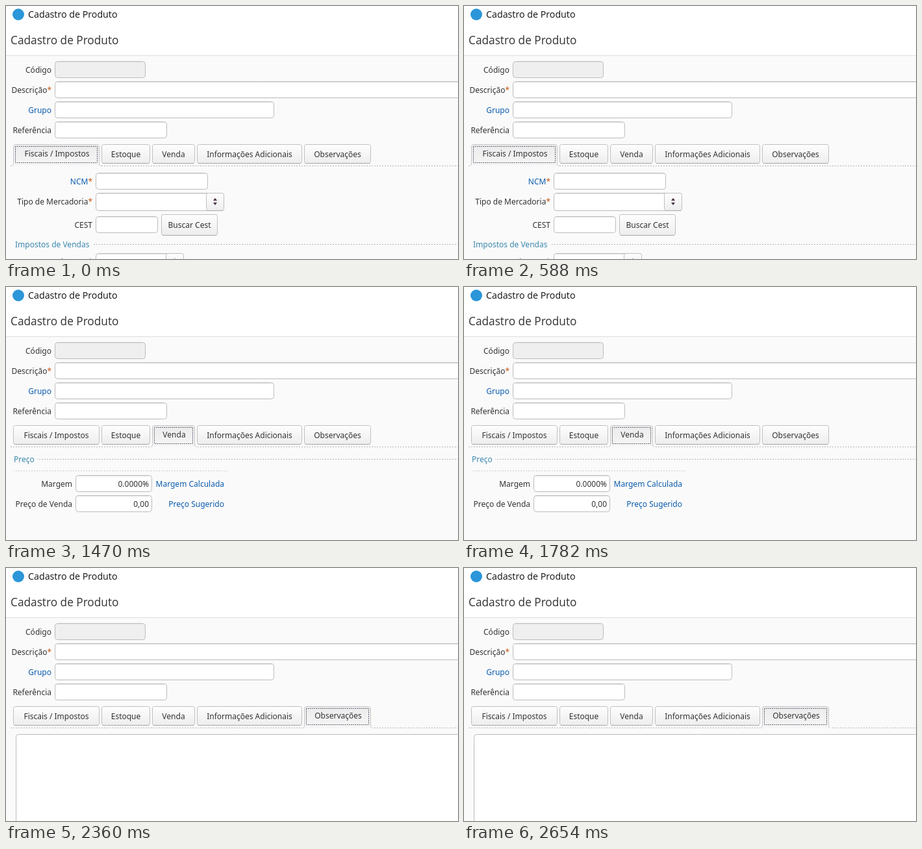
Recreate the animation shown at these times as an HTML page with a canvas. Size 696 by 390 pixels, loop 2850 ms.

```html
<!DOCTYPE html>
<html lang="pt-BR">
<head>
<meta charset="utf-8">
<title>Cadastro de Produto</title>
<style>
html, body { margin: 0; width: 100%; height: 100%; overflow: hidden; background: #fafafa; }
canvas { display: block; }
</style>
</head>
<body>
<canvas id="stage" width="696" height="390"></canvas>
<script>
const c = document.getElementById('stage').getContext('2d');
const INK = '#333', LINK = '#0b5cad', HEAD = '#3a87ad', STAR = '#c4560f';
const BODY = '12px "Noto Sans", sans-serif';

function text(s, x, y, { align = 'left', color = INK, font = BODY } = {}) {
  c.font = font;
  c.textAlign = align;
  c.fillStyle = color;
  c.fillText(s, x, y);
}

function box(x, y, w, h, fill, stroke, r = 4) {
  c.beginPath();
  c.roundRect(x + .5, y + .5, w - 1, h - 1, r);
  c.fillStyle = fill;
  c.fill();
  c.strokeStyle = stroke;
  c.stroke();
}

// All dotted rules share one phase across the stage.
function dots(x1, x2, y, color = '#b4b4b4') {
  c.setLineDash([2, 2]);
  c.lineDashOffset = (x1 + 1) % 4;
  c.strokeStyle = color;
  c.beginPath();
  c.moveTo(x1, y + .5);
  c.lineTo(x2, y + .5);
  c.stroke();
  c.setLineDash([]);
}

function shade(y, h, top, bottom) {
  const g = c.createLinearGradient(0, y, 0, y + h);
  g.addColorStop(0, top);
  g.addColorStop(1, bottom);
  return g;
}

// Right-aligned label; a trailing asterisk marks a required field.
function label(s, right, y, color = INK) {
  if (s.endsWith('*')) {
    text('*', right, y, { align: 'right', color: STAR });
    right -= c.measureText('*').width;
    s = s.slice(0, -1);
  }
  text(s, right, y, { align: 'right', color });
}

function field(x, y, w, name, { value = '', color = INK, fill = '#fff', h = 26 } = {}) {
  box(x, y, w, h, fill, '#bcbcbc');
  c.fillStyle = '#e4e4e4';
  c.fillRect(x + 3, y + 1, w - 6, 1);
  label(name, x - 5, y + 18, color);
  text(value, x + w - 5, y + 18, { align: 'right' });
}

function button(x, y, w, h, s = '') {
  box(x, y, w, h, shade(y, h, '#fefefe', '#ededed'), '#c0c0c0', 3);
  c.fillStyle = '#a8a8a8';
  c.fillRect(x + 2, y + h - 1, w - 4, 1);
  text(s, x + w / 2, y + h / 2 + 4.5, { align: 'center' });
}

function arrow(x, y, dir) {
  c.beginPath();
  c.moveTo(x - 3, y);
  c.lineTo(x + 3, y);
  c.lineTo(x, y + 4 * dir);
  c.fillStyle = '#4a3048';
  c.fill();
}

function select(x, y, w, name) {
  field(x, y, w, name, { h: 28 });
  button(x + w - 28, y, 28, 28);
  arrow(x + w - 14, y + 12, -1);
  arrow(x + w - 14, y + 15, 1);
}

function heading(s, x, y, lineX) {
  text(s, x, y + 5, { color: HEAD });
  dots(lineX, 696, y);
}

function check(x, name) {
  box(x, 284, 16, 16, shade(284, 16, '#f8f8f8', '#e6e6e6'), '#b8b8b8', 2);
  text(name, x + 24, 298);
}

const zero = { value: '0,00' };

const tabs = [
  { name: 'Fiscais / Impostos', x: 11, w: 133, ms: 980, draw() {
    field(138, 257, 173, 'NCM*', { color: LINK });
    select(138, 288, 198, 'Tipo de Mercadoria*');
    field(138, 324, 96, 'CEST');
    button(239, 321, 87, 33, 'Buscar Cest');
    heading('Impostos de Vendas', 14, 367, 134);
    select(138, 381, 136, 'Situação*');
  } },
  { name: 'Estoque', x: 147, w: 75, ms: 490, draw() {
    heading('Dimensões', 14, 265, 80);
    check(21, 'Tamanho');
    check(115, 'Cor');
    heading('Parâmetros', 14, 322, 84);
    field(136, 335, 118, 'Estoque Máximo', zero);
    field(136, 366, 118, 'Estoque Mínimo', zero);
  } },
  { name: 'Venda', x: 225, w: 66, ms: 520, draw() {
    heading('Preço', 12, 265, 48);
    dots(12, 341, 283, '#cacaca');
    field(107, 290, 118, 'Margem', { value: '0.0000%' });
    field(107, 321, 118, 'Preço de Venda', zero);
    label('Margem Calculada', 336, 308, LINK);
    label('Preço Sugerido', 336, 339, LINK);
  } },
  { name: 'Informações Adicionais', x: 294, w: 162, ms: 370, draw() {
    field(135, 257, 118, 'Largura (cm)', zero);
    field(429, 257, 118, 'Altura (cm)', zero);
    field(135, 288, 118, 'Comprimento (cm)', zero);
    field(135, 319, 118, 'Peso Liquido (kg)', zero);
    field(429, 319, 118, 'Peso Bruto (kg)', zero);
    field(135, 350, 173, 'Setor de Localização');
    field(429, 350, 228, 'Número de Série');
    heading('Garantia', 12, 389, 64);
  } },
  { name: 'Observações', x: 459, w: 103, ms: 490, draw() {
    box(15, 256, 700, 160, '#fff', '#bcbcbc');
  } }
];

function activeTab({ name, x, w }) {
  const l = x + .5, r = x + w - .5;
  c.beginPath();
  c.moveTo(l - 3, 246.5);
  c.quadraticCurveTo(l, 246.5, l, 242);
  c.lineTo(l, 217);
  c.quadraticCurveTo(l, 213.5, l + 3, 213.5);
  c.lineTo(r - 3, 213.5);
  c.quadraticCurveTo(r, 213.5, r, 217);
  c.lineTo(r, 242);
  c.quadraticCurveTo(r, 246.5, r + 3, 246.5);
  c.fillStyle = shade(213, 34, '#ebebeb', '#f6f6f6');
  c.fill();
  c.strokeStyle = '#c8c8c8';
  c.stroke();
  c.setLineDash([2, 1]);
  c.lineDashOffset = .5;
  c.strokeStyle = '#6a6a80';
  c.strokeRect(x + 3.5, 216.5, w - 7, 25);
  c.setLineDash([]);
  text(name, x + w / 2 + 1, 232, { align: 'center' });
}

function draw(active) {
  c.fillStyle = '#fafafa';
  c.fillRect(0, 0, 696, 390);
  c.fillStyle = '#fff';
  c.fillRect(0, 0, 696, 76);
  c.fillStyle = '#dedede';
  c.fillRect(0, 76, 696, 1);

  c.beginPath();
  c.arc(19, 13, 9, 0, Math.PI * 2);
  c.fillStyle = '#2b96d9';
  c.fill();
  text('Cadastro de Produto', 34, 18, { color: '#111', font: '14.25px "Open Sans", sans-serif' });
  text('Cadastro de Produto', 7, 59, { font: '17.25px "Open Sans", sans-serif' });

  field(75, 85, 140, 'Código', { fill: '#efefef' });
  field(75, 116, 640, 'Descrição*');
  field(75, 147, 338, 'Grupo', { color: LINK });
  field(75, 178, 173, 'Referência');

  dots(7, active.x - 3, 246);
  dots(active.x + active.w + 3, 696, 246);
  for (const tab of tabs) {
    if (tab === active) activeTab(tab);
    else button(tab.x, 213, tab.w, 30, tab.name);
  }
  active.draw();
}

const total = tabs.reduce((sum, tab) => sum + tab.ms, 0);

function tick() {
  let t = performance.now() % total;
  draw(tabs.find(tab => (t -= tab.ms) < 0));
  requestAnimationFrame(tick);
}
tick();
</script>
</body>
</html>
```
